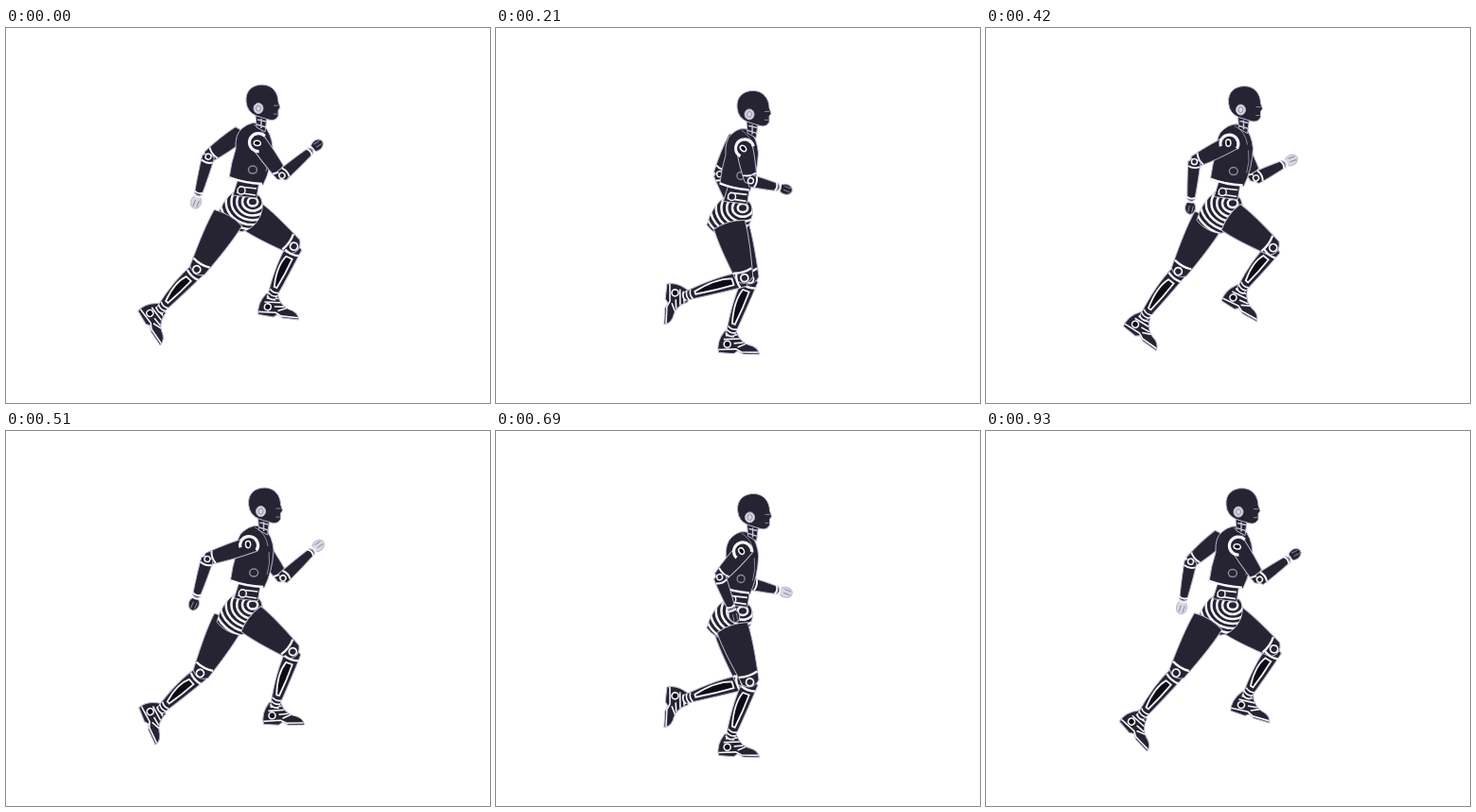
An HTML page with a canvas for the animation above (960 ms loop, 512 by 397 pixels).

```html
<!DOCTYPE html>
<html>
<head>
<meta charset="utf-8">
<title>Running robot</title>
<style>
html, body { margin: 0; height: 100%; overflow: hidden; background: #fff }
canvas { display: block }
</style>
</head>
<body>
<canvas id="stage" width="512" height="397"></canvas>
<script>
const ctx = document.getElementById('stage').getContext('2d');
const LOOP = 960, STEP = 30, TAU = Math.PI * 2, { sin, cos } = Math;
const DARK = '#262432', BLACK = '#0d0c14', EDGE = '#bcb6cf', LIGHT = '#f6f5fa', GREY = '#8d899b';

// Each joint swings as a sum of a few harmonics of the stride phase
const wave = (p, mean, c1, s1, c2 = 0, s2 = 0, c3 = 0) =>
  mean + c1 * cos(p) + s1 * sin(p) + c2 * cos(2 * p) + s2 * sin(2 * p) + c3 * cos(3 * p);

const legPose = p => ({
  knee: [wave(p, 260, 51.5, -7, -6, 2), wave(p, 255, -12.4, 2.8, -11, 2)],
  ankle: [wave(p, 222, 61, 11, 0, 5.5, -2), wave(p, 297.5, -6.8, 21.7, -6, 2)],
  tilt: wave(p, 39, -20, -45.5, -8, 1.5, -5) * TAU / 360
});

const armPose = p => ({
  elbow: [wave(p, 253, 39, 9), wave(p, 153, 10, 1.6, -6.8, -2.8)],
  hand: [wave(p, 273, 64, 15, -8, -3), wave(p, 171, -30, -6.8, -16.8, -8.5)]
});

function shape(path, fill, stroke, width = 1) {
  const p = typeof path === 'string' ? new Path2D(path) : path;
  if (fill) { ctx.fillStyle = fill; ctx.fill(p); }
  if (stroke) { ctx.strokeStyle = stroke; ctx.lineWidth = width; ctx.stroke(p); }
}

function oval(x, y, rx, ry, fill, stroke, width) {
  const p = new Path2D();
  p.ellipse(x, y, rx, ry, 0, 0, TAU);
  shape(p, fill, stroke, width);
}

function at([x, y], angle, draw) {
  ctx.save();
  ctx.translate(x, y);
  ctx.rotate(angle);
  draw();
  ctx.restore();
}

// Draws in a frame whose x axis runs from a to b
function along(a, b, draw) {
  const dx = b[0] - a[0], dy = b[1] - a[1];
  at(a, Math.atan2(dy, dx), () => draw(Math.hypot(dx, dy)));
}

function tube(start, len, w0, w1, front, back) {
  const m = (w0 + w1) / 2;
  shape(`M${start} ${-w0}Q${len * .4} ${-m - front} ${len} ${-w1}Q${len + w1} 0 ${len} ${w1}
    Q${len * .4} ${m + back} ${start} ${w0}Q${start - 5} 0 ${start} ${-w0}Z`, DARK, EDGE);
}

function band(x, w, width = 2) {
  shape(`M${x} ${-w}Q${x + 3} 0 ${x} ${w}`, null, LIGHT, width);
}

function foot() {
  shape('M-6-3L6-3Q10 8 19 11Q30 13 31 21L14 21L8 18L4 21L-12 20Q-15 9-6-3Z', DARK, EDGE);
  shape('M-12 17L6 16L12 19L30 19M-5 2L7 1M-7 6L10 5M4 10L14 9M8 14L17 10', null, LIGHT, 1.6);
  oval(-3, 11, 3.5, 3.5, BLACK, LIGHT, 1.6);
}

function leg(p, bob) {
  const { knee, ankle, tilt } = legPose(p);
  at(ankle, tilt, foot);
  along(knee, ankle, len => {
    tube(0, len, 8, 4.5, 1, 5);
    shape(`M13-3Q${len * .5}-3 ${len - 11}-1L${len - 11} 2Q${len * .45} 9 13 4Z`, BLACK, LIGHT, 1.8);
    for (const x of [len - 7, len - 3, len + 1]) band(x, 5, 1.6);
  });
  along([246 + 7 * cos(p), 194 + bob], knee, len => {
    tube(8, len, 17, 9, 4, 4);
    band(len - 9, 10, 2.4);
  });
  along(knee, ankle, () => {
    band(7, 8, 2.4);
    oval(0, 1, 4, 4, DARK, LIGHT, 1.8);
  });
}

function arm(p, bob, near) {
  const { elbow, hand } = armPose(p);
  const shoulder = [(near ? 262 : 254) + (near ? 5 : 11) * cos(p), (near ? 121 : 115) + bob];
  along(shoulder, elbow, len => {
    tube(-6, len, 8.5, 6.5, 2, 2);
    band(len - 7, 7);
  });
  along(elbow, hand, len => {
    tube(0, len - 9, 6.5, 4, 1, 1);
    band(5, 6);
    oval(0, 0, 3, 3, DARK, LIGHT, 1.5);
    oval(len, 0, 7, 5.5, near ? DARK : '#d9d7e2', EDGE);
    band(len - 11, 4.5, 2);
    band(len - 7, 5, 1.5);
    shape(`M${len - 2}-3L${len + 5}-2M${len - 2} 1L${len + 5} 2`, null, GREY);
  });
  if (near) at(shoulder, -.7 * (1 + cos(p)), () => {
    const cuff = new Path2D();
    cuff.arc(0, 0, 9.5, 2.9, 6.9);
    shape(cuff, null, LIGHT, 3.2);
    oval(-1, -1, 2.6, 3.6, BLACK, LIGHT, 1.5);
  });
}

function pelvis() {
  const body = new Path2D('M243 172L266 175Q275 184 269 199Q262 214 247 216Q231 213 223 202Q228 182 243 172Z');
  shape(body, DARK, EDGE);
  ctx.save();
  ctx.clip(body);
  for (let r = 5; r < 44; r += 5.5) oval(261, 184, r * 1.05, r * .9, null, LIGHT, 2.5);
  ctx.restore();
}

function torso(twist) {
  shape('M246 158L268 162L265 180L240 177Z', DARK, EDGE);
  shape('M247 168L265 170M244 174L264 177', null, LIGHT, 1.6);
  oval(249, 172, 4, 4, DARK, LIGHT, 1.5);
  ctx.transform(twist, 0, 0, 1, 238 * (1 - twist), 0);
  shape('M250 106Q261 97 272 102Q281 112 282 126Q281 148 272 166L236 159Q238 143 243 128Q242 112 250 106Z', DARK, EDGE);
  shape('M236 158Q252 164 271 165', null, LIGHT, 2.4);
  shape('M262 102Q274 108 276 122M277 128Q279 140 275 152', null, GREY);
  oval(261, 150, 4.5, 4, null, GREY, 1.5);
}

function head() {
  shape('M264 92L276 95L274 110L265 105Z', DARK, EDGE);
  shape('M266 97L275 99M265 102L275 105M270 96L270 106', null, '#c9c6d3', 1.5);
  shape('M254 78C253 66 261 60 271 60C282 60 288 69 288 78L290 84L288 87L288 93Q285 99 278 97L265 93Q255 89 254 78Z', DARK, EDGE);
  shape('M283 82L288 82M283 91L287 91', null, GREY);
  oval(267, 85, 5, 5.5, '#d9d7e2', EDGE);
  oval(267, 85, 2.5, 3, null, GREY);
}

function draw(p) {
  const bob = 3.5 - 3.5 * cos(2 * p - .2), lean = 1.3 - 1.3 * cos(p);
  const opposite = p + TAU / 2;
  ctx.clearRect(0, 0, 512, 397);
  arm(opposite, bob, false);
  leg(p, bob);
  at([0, bob], 0, pelvis);
  leg(opposite, bob);
  at([lean / 2, bob], 0, () => torso(1 - .12 * sin(p) ** 2));
  at([lean, bob], 0, head);
  arm(p, bob, true);
}

function tick() {
  const t = Math.floor(performance.now() % LOOP / STEP) * STEP;
  draw(t / LOOP * TAU);
  requestAnimationFrame(tick);
}
tick();
</script>
</body>
</html>
```
